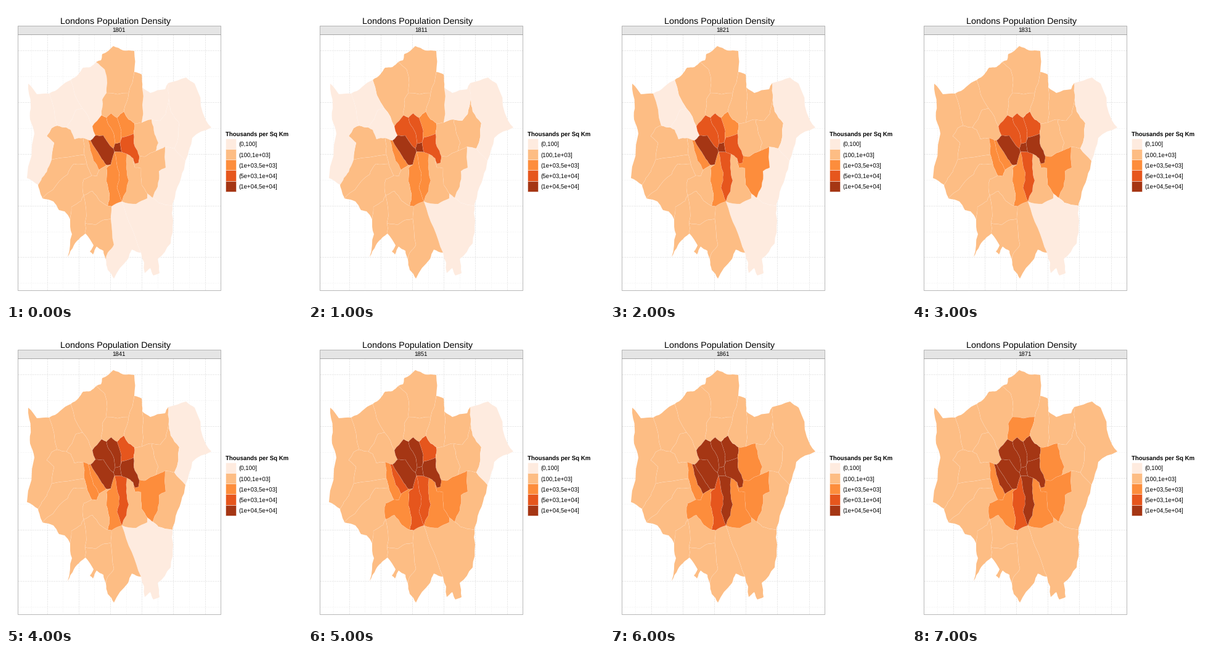
Recreate the animation shown at these times as a matplotlib script. Size 480x480 px, loop 8000 ms.

```python
from itertools import combinations

import numpy as np
import matplotlib.pyplot as plt
from matplotlib.animation import FuncAnimation
from matplotlib.patches import Polygon, Rectangle

plt.rcParams["font.family"] = "Liberation Sans"
plt.rcParams["text.hinting"] = "none"

PX = 0.72  # points per pixel at 100 dpi
COLORS = ["#feebdf", "#fdbd84", "#fd8d3c", "#e6561d", "#a53614"]
LABELS = ["(0,100]", "(100,1e+03]", "(1e+03,5e+03]", "(5e+03,1e+04]", "(1e+04,5e+04]"]

# First density class (otherwise 1), then the boroughs that rise one class each decade
START = {0: "hil har bre bar red bkg hav bex bro cro",
         2: "ken cam isl hac sou lam", 3: "tow", 4: "wes cit"}
RISES = ["", "bar bkg cro cam isl", "hil red gre sou", "har bre bex ham hac tow",
         "cam isl", "bro lew wan ken lam", "hav new hac ken sou", "hgy"]

nodes = {}  # point -> boroughs meeting there
bends = {}  # pair of boroughs -> key points of their border


def node(x, y, sides):
    nodes[x, y] = set(sides.split())


def bend(pair, *xy):
    bends[frozenset(pair.split())] = [tuple(p) for p in np.reshape(xy, (-1, 2))]


def length(path):
    return np.hypot(*np.diff(path, axis=0).T).sum()


def wiggle(path, rng, amount=0.07, rounds=2):
    """Roughen a line by pushing the middle of each segment sideways."""
    for _ in range(rounds):
        fine = path[:1]
        for (x0, y0), (x1, y1) in zip(path, path[1:]):
            k = rng.uniform(-amount, amount)
            mid = ((x0 + x1) / 2 - k * (y1 - y0), (y0 + y1) / 2 + k * (x1 - x0))
            fine += [mid, (x1, y1)]
        path = fine
    return path


def borders():
    """Two boroughs share a border when they meet at two nodes."""
    rng = np.random.default_rng(3)
    lines = {}
    for pair in combinations(sorted(set().union(*nodes.values())), 2):
        ends = [p for p, sides in nodes.items() if sides.issuperset(pair)]
        if len(ends) == 2:
            keys = bends.get(frozenset(pair), [])
            path = min(([ends[0], *k, ends[1]] for k in (keys, keys[::-1])), key=length)
            lines[pair] = wiggle(path, rng)
    return lines


def outline(name, lines):
    """Join the borders of a borough end to end."""
    parts = [line for pair, line in lines.items() if name in pair]
    path = list(parts.pop())
    while parts:
        part = next(p for p in parts if path[-1] in (p[0], p[-1]))
        parts.remove(part)
        path += part[1:] if part[0] == path[-1] else part[-2::-1]
    return path


# Nodes on the outer edge, clockwise
node(52, 290, "out hou hil")
node(70, 142, "out hil har")
node(105, 120, "out har bar")
node(146, 91, "out bar enf")
node(208, 107, "out enf waf")
node(221, 132, "out waf red")
node(263, 125, "out red hav")
node(291, 251, "out hav bex")
node(270, 324, "out bex bro")
node(219, 400, "out bro cro")
node(162, 411, "out cro sut")
node(129, 369, "out sut kin")
node(104, 346, "out kin ric")
node(59, 312, "out ric hou")

# Inner nodes, north of the river
node(83, 194, "hil har eal")
node(74, 249, "hil eal hou")
node(124, 166, "har bar bre")
node(98, 197, "har bre eal")
node(125, 214, "bre eal ham")
node(133, 217, "bre ham ken")
node(137, 218, "bre ken wes")
node(145, 210, "bre wes cam")
node(140, 195, "bre bar cam")
node(155, 177, "bar cam hgy")
node(163, 141, "bar enf hgy")
node(199, 141, "enf hgy waf")
node(191, 171, "hgy waf hac")
node(180, 181, "hgy isl hac")
node(163, 181, "hgy cam isl")
node(177, 223, "cam isl cit")
node(174, 231, "cam wes cit")
node(185, 221, "isl hac cit tow")
node(207, 207, "hac tow new")
node(208, 190, "waf hac new")
node(220, 189, "waf red new")
node(236, 184, "red new bkg")
node(264, 150, "red bkg hav")
node(127, 241, "eal ham hou")

# Inner nodes along and south of the river
node(131, 256, "ham hou ric")
node(139, 275, "ham ric wan")
node(151, 266, "ham ken wan")
node(163, 258, "ken wes wan")
node(170, 257, "wes lam wan")
node(176, 236, "wes cit lam sou")
node(188, 237, "cit tow sou")
node(196, 240, "tow sou lew")
node(206, 247, "tow lew gre")
node(216, 243, "tow new gre")
node(243, 235, "new bkg gre")
node(258, 228, "bkg gre bex")
node(273, 231, "bkg hav bex")
node(238, 311, "gre bex bro")
node(229, 304, "gre lew bro")
node(188, 317, "sou lew bro cro lam")
node(171, 325, "lam cro mer")
node(165, 324, "lam wan mer")
node(126, 307, "ric wan kin mer")
node(128, 352, "kin mer sut")
node(170, 345, "mer sut cro")

# Key points of the outer edge
bend("out hil", 34, 279, 46, 207, 39, 184, 40, 160, 36, 126, 50, 143)
bend("out har", 88, 131)
bend("out bar", 118, 110, 125, 100, 137, 99)
bend("out enf", 154, 88, 156, 78, 174, 65, 190, 72, 208, 73)
bend("out waf", 220, 111)
bend("out red", 234, 141, 258, 135)
bend("out hav", 292, 116, 306, 126, 319, 173, 333, 197, 302, 214)
bend("out bex", 284, 278, 274, 310)
bend("out bro", 271, 348, 267, 385, 246, 410, 249, 433, 239, 437, 234, 425, 225, 433)
bend("out cro", 204, 395, 198, 410, 175, 442, 165, 428)
bend("out sut", 158, 397, 147, 390, 141, 403, 136, 398, 142, 388)
bend("out kin", 121, 375, 110, 388, 100, 407, 107, 370)
bend("out ric", 95, 333, 86, 331, 77, 317)
bend("out hou", 55, 301)

# Key points of the inner borders
bend("hil eal", 74, 198, 66, 211, 78, 222)
bend("hil hou", 66, 269, 58, 279)
bend("har bre", 113, 169)
bend("bre eal", 105, 201, 111, 216)
bend("bar hgy", 156, 152)
bend("bar enf", 164, 125, 160, 103)
bend("hgy isl", 171, 174)
bend("cam isl", 165, 190, 174, 205)
bend("cam wes", 165, 221, 158, 210)
bend("isl hac", 187, 203)
bend("hac tow", 188, 213)
bend("waf hac", 199, 184)
bend("red bkg", 250, 186, 259, 175)
bend("bkg hav", 267, 171, 281, 190)
bend("new bkg", 241, 208, 247, 222)
bend("tow new", 209, 228)
bend("new gre", 226, 244)
bend("tow gre", 215, 254, 209, 256)
bend("sou lew", 195, 262, 199, 283)
bend("lew gre", 209, 262, 219, 263, 220, 290)
bend("lew bro", 229, 312, 211, 321)
bend("gre bex", 259, 262, 248, 268, 246, 293)
bend("bex bro", 247, 319)
bend("sou lam", 184, 271, 180, 295)
bend("bro cro", 204, 360)
bend("lam wan", 168, 305, 163, 285, 163, 263)
bend("wes ken", 153, 244, 144, 230)
bend("ham ken", 142, 251)
bend("ham wan", 147, 276)
bend("ric wan", 126, 281, 124, 294)
bend("ric kin", 122, 316, 106, 326)
bend("wan mer", 140, 300, 152, 316)
bend("mer sut", 145, 355, 158, 347)
bend("sut cro", 175, 387, 165, 400)
bend("hou ric", 110, 256, 100, 273, 76, 298)

fig = plt.figure(figsize=(4.8, 4.8), dpi=100, facecolor="white")
ax = fig.add_axes([0, 0, 1, 1])
ax.set_xlim(0, 480)
ax.set_ylim(480, 0)
ax.axis("off")


def label(x, y, s, size=9.6, **kw):
    return ax.text(x, y, s, size=size * PX, color="black", va="baseline", **kw)


def box(x, y, w, h, **kw):
    ax.add_patch(Rectangle((x, y), w, h, **kw))


def grid(x0, y0, nx, ny, color):
    style = dict(color=color, lw=0.7 * PX, ls=(0, (4, 1.5)), zorder=0)
    for i in range(nx):
        ax.plot([x0 + 51.2 * i] * 2, [46, 460.5], **style)
    for i in range(ny):
        ax.plot([18.7, 347.5], [y0 + 83.8 * i] * 2, **style)


grid(40.9, 114.1, 6, 5, "#f5f5f5")
grid(66.5, 72.2, 6, 5, "#e2e2e2")

lines = borders()
shapes = {}
for name in sorted(set().union(*lines) - {"out"}):
    shapes[name] = ax.add_patch(Polygon(outline(name, lines), lw=0, zorder=2))
for pair, line in lines.items():
    if "out" not in pair:
        ax.plot(*zip(*line), color="white", alpha=0.25, lw=0.5 * PX, zorder=3)

FRAME = dict(ec="#8c8c8c", lw=0.6 * PX, zorder=4)
box(18.7, 46, 328.8, 414.5, fc="none", **FRAME)
box(18.7, 32.3, 328.8, 13.7, fc="#e5e5e5", **FRAME)

label(177.4, 29, "Londons Population Density", 14.4, ha="center")
year = label(183.3, 43, "", ha="center", zorder=5)

label(355.7, 211.1, "Thousands per Sq Km", weight="bold")
for i, (color, text) in enumerate(zip(COLORS, LABELS)):
    top = 214.6 + 17.28 * i
    box(355.7, top, 17.28, 17.28, fc=color, ec="white", lw=0.5 * PX)
    label(377.2, top + 12.6, text)


def density(name, decade):
    first = next((c for c, group in START.items() if name in group.split()), 1)
    return first + sum(name in group.split() for group in RISES[:decade + 1])


def draw(decade):
    year.set_text(str(1801 + 10 * decade))
    for name, shape in shapes.items():
        shape.set_facecolor(COLORS[density(name, decade)])
    return [year, *shapes.values()]


anim = FuncAnimation(fig, draw, frames=len(RISES), interval=1000, repeat=True,
                     repeat_delay=0, blit=False)
plt.show()
```
